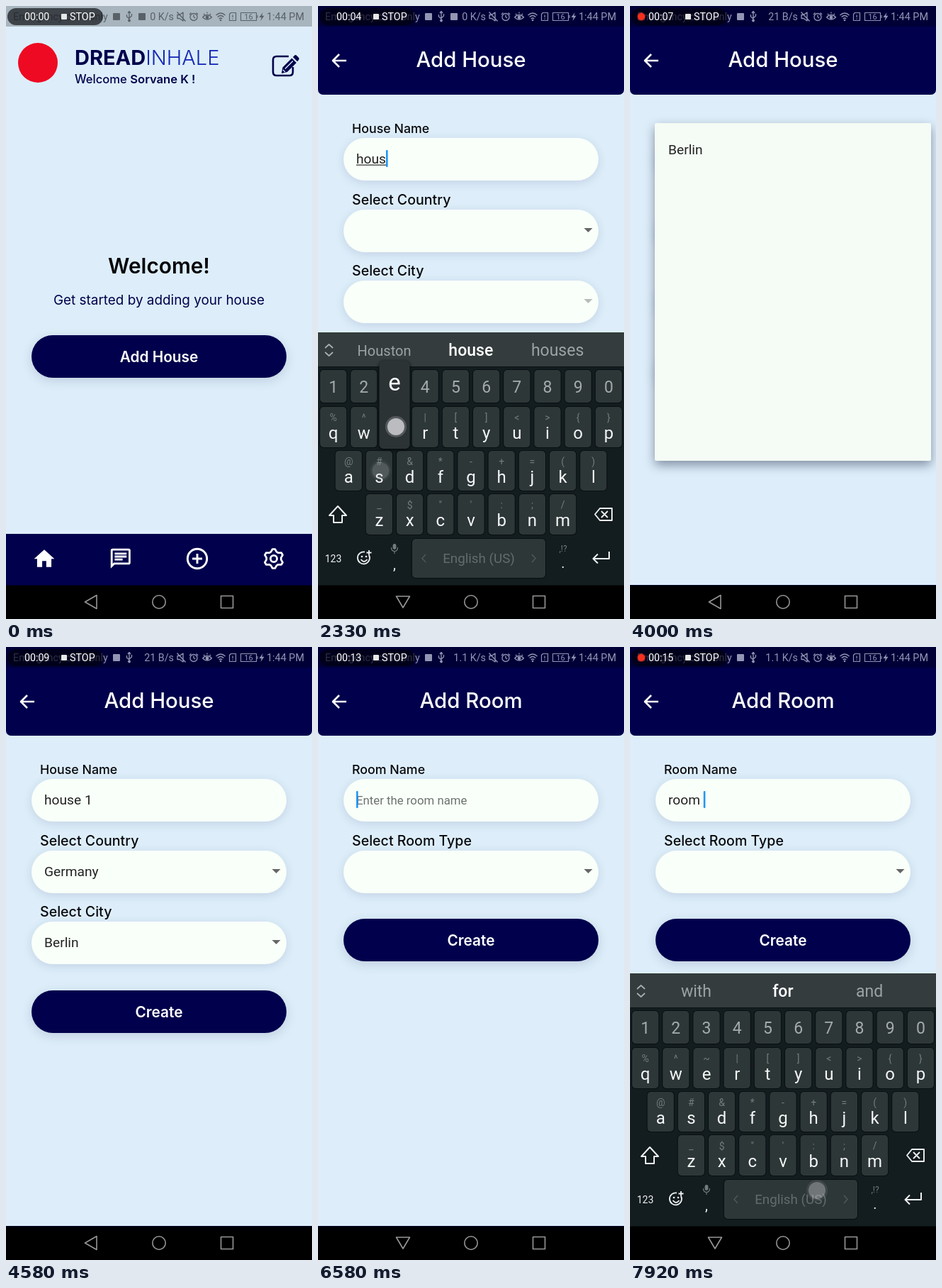
Write an HTML page with a canvas that moves like this. It is 432 px wide and 864 px high and loops after 8000 ms.

```html
<!DOCTYPE html>
<html lang="en">
<head>
<meta charset="utf-8">
<title>Adding a house and a room</title>
<style>
html, body { margin: 0; width: 100%; height: 100%; overflow: hidden; background: #ddeefa; }
canvas { display: block; width: 100vw; height: 100vh; }
</style>
</head>
<body>
<canvas id="stage"></canvas>
<script>
const W = 432, H = 864, LOOP = 8000, FPS = 12;
const NAVY = '#00004c', SKY = '#ddeefa', FIELD = '#f9fff9';
const canvas = document.getElementById('stage'), c = canvas.getContext('2d');
const dpr = window.devicePixelRatio || 1;
canvas.width = W * dpr;
canvas.height = H * dpr;

const ramp = (t, a, b) => Math.min(1, Math.max(0, (t - a) / (b - a)));
const ease = p => 1 - (1 - p) ** 3;
const between = (t, a, b) => t >= a && t < b;

// ---- drawing helpers ----
function group(draw, { x = 0, y = 0, scale = 1, alpha = 1 } = {}) {
  c.save();
  c.translate(x, y);
  c.scale(scale, scale);
  c.globalAlpha *= alpha;
  draw();
  c.restore();
}
function text(s, x, y, size, fill, { weight = 400, align = 'left', font = 'Roboto' } = {}) {
  c.font = `${weight} ${size}px ${font}, sans-serif`;
  c.textAlign = align;
  c.fillStyle = fill;
  c.fillText(s, x, y);
  return c.measureText(s).width;
}
const heading = (s, x, y, size, fill, weight = 500, align = 'center') =>
  text(s, x, y, size, fill, { weight, align, font: 'Inter' });
const centred = (s, x, y, size, fill, weight = 400) => text(s, x, y, size, fill, { weight, align: 'center' });

function box(x, y, w, h, r, fill, shadow) {
  c.save();
  if (shadow) [c.shadowColor, c.shadowBlur, c.shadowOffsetY] = shadow;
  c.fillStyle = fill;
  c.beginPath();
  c.roundRect(x, y, w, h, r);
  c.fill();
  c.restore();
}
function disc(x, y, r, fill) {
  c.fillStyle = fill;
  c.beginPath();
  c.arc(x, y, r, 0, 7);
  c.fill();
}
function line(d, color, width, x = 0, y = 0) {
  group(() => {
    c.strokeStyle = color;
    c.lineWidth = width;
    c.lineJoin = 'round';
    c.stroke(new Path2D(d));
  }, { x, y });
}
function shape(d, fill, x = 0, y = 0, scale = 1) {
  group(() => { c.fillStyle = fill; c.fill(new Path2D(d), 'evenodd'); }, { x, y, scale });
}
const ring = r => `M${r} 0A${r} ${r} 0 1 1 ${-r} 0A${r} ${r} 0 1 1 ${r} 0Z`;

// ---- script of the recording ----
const keyRows = [
  ['1234567890', 513, 46, 21.6, ''],
  ['qwertyuiop', 565, 57, 21.6, '%^~|[]<>{}'],
  ['asdfghjkl', 627, 56, 43.2, '@#&*-+=()'],
  ['zxcvbnm', 688, 57, 86.4, '_$"\':;/']
];
const keys = { ' ': { x: 264, y: 738, h: 55 } };
for (const [chars, y, h, x0, hints] of keyRows)
  [...chars].forEach((ch, i) => keys[ch] = { x: x0 + i * 43.2, y, h, hint: hints[i] });

const HOLD = 90;
const housePresses = [['h', 1420], ['o', 1640], ['u', 1900], ['s', 2140], ['e', 2290], [' ', 2520], ['1', 2720]];
const roomPresses = [['r', 6950], ['o', 7150], ['o', 7330], ['m', 7570], [' ', 7790]];
const presses = [...housePresses, ...roomPresses];
const taps = [[216, 494, 400], [330, 317, 3050], [100, 545, 3480], [330, 417, 3720],
  [90, 202, 4120], [216, 514, 4700], [216, 536, 5960],
  ...presses.map(([ch, t]) => [keys[ch].x + (ch === ' ' ? 0 : 2), keys[ch].y + 28, t])];
const typed = (list, t) => list.filter(p => t >= p[1] + HOLD).map(p => p[0]).join('');

const suggestions = {
  h: 'have he his', ho: 'how home hope', hou: 'hours hour house', hous: 'Houston house houses',
  house: 'houses house housed', 1: '10 1 1st', r: 'are r right', ro: 'room road role',
  roo: 'roof room root', room: 'rooms room roommate'
};
const countries = ['Austria', 'Belgium', 'Canada', 'Denmark', 'Egypt', 'France', 'Germany', 'Italy'];

// ---- screens ----
function button(label, y) {
  box(36, y, 360, 60, 30, NAVY, ['rgba(0,0,60,.14)', 16, 4]);
  heading(label, 216, y + 37.5, 20.8, '#fff', 600);
}

function editIcon() {
  line('M399 71H382Q377 71 377 76V93Q377 98 382 98H400Q405 98 405 93V86', NAVY, 2.6);
  shape('M389 95L390.5 86.5L403.5 73.5L410 80L397 93ZM405 72L407.5 69.5Q409 68.5 410.5 70L413 72.5Q414.5 74 413.5 75.5L411.3 78.2Z', NAVY);
  line('M394 88.5L405 77.5M391 90L394 93', SKY, 1.3);
}

function gear(x, y) {
  let d = '';
  for (let i = 0; i < 24; i++) {
    const r = i % 4 < 2 ? 13.6 : 10.4, a = (i - .5) * Math.PI / 12;
    d += `${i ? 'L' : 'M'}${r * Math.sin(a)} ${-r * Math.cos(a)}`;
  }
  line(d + 'Z', '#fff', 2.7, x, y);
  line(ring(4.6), '#fff', 2.8, x, y);
}

function home(hasHouse) {
  box(0, 0, W, 817, 0, SKY);
  disc(45, 80, 28, '#ee0a22');
  const w = heading('DREAD', 97, 83, 29, NAVY, 700, 'left');
  heading('INHALE', 97 + w, 83, 29, '#1426b4', 300, 'left');
  const hello = heading('Welcome ', 97, 108.5, 16.6, NAVY, 500, 'left');
  heading('Sorvane K !', 97 + hello, 108.5, 16.6, NAVY, 600, 'left');
  editIcon();
  if (hasHouse) {
    box(167, 151, 98, 58, 13, NAVY);
    centred('house 1', 215.5, 185, 16.5, '#fff', 500);
  }
  group(() => {
    heading(hasHouse ? 'Your Rooms' : 'Welcome!', 216, 376.5, 29.8, '#050508', 600);
    heading(`Get started by adding your ${hasHouse ? 'rooms' : 'house'}`, 216, 420.5, 18.9, NAVY, 400);
    button(hasHouse ? 'Add Room' : 'Add House', 464);
  }, { y: hasHouse ? 42 : 0 });

  box(0, 744, W, 73, 0, NAVY);
  shape('M10 20v-6h4v6h5v-8h3L12 3 2 12h3v8z', '#fff', 36.7, 762, 1.44);
  shape('M4 4h16v12H5.2L4 17.2zM4 2Q2 2 2 4V22L6 18H20Q22 18 22 16V4Q22 2 20 2ZM6 12h8v2H6zM6 9h12v2H6zM6 6h12v2H6z', '#fff', 145, 762, 1.4);
  line(ring(13.7) + 'M-7 0H7M0 -7V7', '#fff', 2.9, 270, 779);
  gear(378, 779);
}

function field(label, y, size) {
  heading(label, 48, y - 7.2, size, '#08080c', 500, 'left');
  box(36, y, 360, 60, 30, FIELD, ['rgba(0,0,70,.12)', 14, 3]);
}
function select(label, y, value, enabled = true) {
  field(label, y, 19.6);
  shape('M375.5 0H387.5L381.5 6Z', enabled ? '#666' : '#b7bcba', 0, y + 26);
  if (value) text(value, 54, y + 36, 19.2, '#222');
}
function input(label, hint, value, focused) {
  field(label, 186, 17.8);
  if (!value) text(hint, 54, 221.5, 16.8, '#6d716e');
  const w = text(value, 54, 221.5, 19.2, '#222');
  const start = value.lastIndexOf(' ') + 1;
  if (focused && start < value.length) {
    const x = 54 + c.measureText(value.slice(0, start)).width;
    box(x, 223.5, 54 + w - x, 1.3, 0, '#333');
  }
  if (focused) box(54 + w, 203, 2.6, 24, 1, '#2196f3');
}
function form(title, body) {
  box(0, 0, W, 816, 0, SKY);
  box(0, 0, W, 125, [0, 0, 7, 7], NAVY);
  line('M40 77H21.5M30 68L21 77L30 86', '#fff', 2.6);
  heading(title, 216, 86, 29.4, '#fff', 500);
  body();
}
function menu(items, t, opens, closes) {
  const p = ease(ramp(t, opens, opens + 160)), alpha = p * (1 - ramp(t, closes, closes + 130));
  if (!alpha) return;
  group(() => {
    box(35, 165, 390, 476 * (.3 + .7 * p), 2, '#f5fbf5', ['rgba(0,10,40,.42)', 15, 6]);
    items.forEach((s, i) => {
      if (i * 57.6 < 430 * p) text(s, 54, 208.5 + i * 57.6, 19.2, '#222');
    });
  }, { alpha });
}
function houseForm(t) {
  form('Add House', () => {
    input('House Name', 'Enter the house name', typed(housePresses, t), between(t, 750, 3000));
    select('Select Country', 287, t > 3560 && 'Germany');
    select('Select City', 387, t > 4200 && 'Berlin', t > 3560);
    button('Create', 484);
    menu(countries, t, 3130, 3560);
    menu(['Berlin'], t, 3790, 4200);
  });
}
function roomForm(t) {
  form('Add Room', () => {
    input('Room Name', 'Enter the room name', typed(roomPresses, t), t > 6300);
    select('Select Room Type', 287);
    button('Create', 383);
  });
}

// ---- keyboard ----
function keyboard(t) {
  box(0, 460, W, 357, 0, '#131c1f');
  box(0, 460, W, 48, 0, '#343c3d');
  box(0, 508, W, 1, 0, '#0b1214');
  line('M10 482L15.5 477L21 482M10 488L15.5 493L21 488', '#a9afb0', 1.7);
  const word = typed(t < 5000 ? housePresses : roomPresses, t).split(' ').pop();
  (suggestions[word] || 'with for and').split(' ').forEach((s, i) => {
    c.font = '400 23px Roboto, sans-serif';
    const size = Math.min(23, 23 * 76 / c.measureText(s).width);
    centred(s, 93.5 + i * 122.3, 493, size, i === 1 ? '#fff' : '#9da3a4', i === 1 ? 500 : 400);
  });

  for (const [ch, k] of Object.entries(keys)) {
    if (ch === ' ') continue;
    keycap(k.x - 18.6, k.y, 37.2, k.h);
    if (k.hint) {
      centred(k.hint, k.x, k.y + 20, 14, '#737b7d');
      centred(ch, k.x, k.y + 45, 24, '#f4f6f6');
    } else centred(ch, k.x, k.y + 31.5, 23, '#a5abac');
  }
  keycap(133, 751, 188, 55);
  centred('English (US)', 227, 785, 18.8, '#626b6d');
  line('M152 773L147 778.5L152 784M302 773L307 778.5L302 784', '#4d5759', 1.5);

  const ink = '#eef1f1';
  line('M28 705L40 718H34V728H22V718H16Z', ink, 2);
  line('M398 708H415V725H398L391 716.5ZM400 712L409 721M409 712L400 721', ink, 1.9);
  centred('123', 21.5, 784, 14, ink);
  line('M72 774A8.5 8.5 0 1 1 66 769.5M60.5 780Q65 786 69.5 780M72 767V774M68.5 770.5H75.5', ink, 1.8, 0, 0);
  disc(62, 776, 1.3, ink);
  disc(68, 776, 1.3, ink);
  box(105.6, 758, 4.8, 8, 2.4, '#737b7d');
  line('M103.5 763Q103.5 768.5 108 768.5T112.5 763M108 768.5V772', '#737b7d', 1.2);
  centred(',', 108, 794, 20, ink);
  centred(',!?', 346, 769, 12, '#737b7d');
  centred('.', 346, 792, 20, ink);
  line('M411 769V779H389M395 772.5L388.5 779L395 785.5', ink, 2);

  for (const [ch, at] of presses) {
    if (ch === ' ' || !between(t, at, at + HOLD)) continue;
    const k = keys[ch];
    box(k.x - 21.5, k.y - 65, 43, k.h + 67, 6, '#2b3335', ['rgba(0,0,0,.8)', 4, 1]);
    centred(ch, k.x, k.y - 23, 33, '#fff');
  }
}
function keycap(x, y, w, h) {
  box(x - 1, y - 1, w + 2, h + 2, 6, '#080f11');
  box(x, y, w, h, 5, '#2e3738');
}

// ---- system bars ----
function statusBar(t, dark) {
  box(0, 0, W, 29, 0, `rgba(0,0,0,${dark ? .28 : .24})`);
  const ink = dark ? '#9494b4' : '#596168';
  text('Emergency calls only', 10, 20, 14.3, ink);
  box(2, 3, 135, 24, 12, dark ? 'rgba(0,0,14,.68)' : 'rgba(20,24,28,.72)');
  const clock = Math.max(0, t * .00204 - .21);
  if (clock % 1 > .56) {
    disc(16, 15, 6.2, 'rgba(255,50,30,.35)');
    disc(16, 15, 5, '#f5301e');
  }
  text('00:' + String(Math.floor(clock)).padStart(2, '0'), 26, 20, 14.2, '#fff');
  box(78, 11, 8, 8, 1, '#e8e8e8');
  text('STOP', 90, 20, 14.3, '#fff');

  box(151, 10, 10, 10, 1, ink);
  line('M174 8V21M170.5 12V15L174 18M177.5 11V14L174 17M172 10L174 7.5L176 10', ink, 1.3);
  disc(174, 20.5, 1.9, ink);
  const rate = t < 3300 ? '0 K/s' : t < 5080 ? '21 B/s' : t < 6080 ? '1 K/s' : '1.1 K/s';
  if (rate.length < 6) box(187, 10, 10, 10, 1, ink);
  text(rate, 237, 20, 14.3, ink, { align: 'right' });
  line('M242 12.5H245L250 9V21L245 17.5H242ZM241.5 8.5L253.5 21.5', ink, 1.3);
  line(ring(5) + 'M0 -3V0L2.2 1.5M-6 -3.5L-3.5 -6M6 -3.5L3.5 -6', ink, 1.3, 265, 15.5);
  line('M277.5 16Q284 9 290.5 16Q284 22 277.5 16M279 11L280.5 12.5M284 8.5V10.5M289 11L287.5 12.5', ink, 1.3);
  disc(284, 16, 2.4, ink);
  line('M296.5 13Q303 7 309.5 13M298.7 15.6Q303 11.5 307.3 15.6M300.8 18Q303 16 305.2 18', ink, 1.4);
  disc(303, 20, 1.3, ink);
  line('M317.5 9.5H324.5V20.5H315.5V11.5ZM320 12.5V16M320 17.4V18.8', ink, 1.2);
  line('M331.5 9.5H353.5V20.5H331.5ZM355 13V17', ink, 1.1);
  centred('16', 342.5, 19, 11, ink);
  shape('M362.5 9L357.5 16H360.7L359.5 21L364.5 13.8H361.3Z', ink);
  text('1:44 PM', 368, 20, 14.4, ink);
}
function navBar(keyboardMode) {
  box(0, 816.5, W, 48, 0, '#000');
  const grey = '#969696';
  line(keyboardMode ? 'M110.5 832H129.5L120 848Z' : 'M128 830.5V849.5L111.5 840Z', grey, 1.6);
  line(ring(9.2), grey, 1.6, 216, 840);
  line('M303.5 831.5H320.5V848.5H303.5Z', grey, 1.6);
}
function touches(t) {
  for (const [x, y, at] of taps) {
    if (!between(t, at, at + 240)) continue;
    const alpha = t < at + HOLD ? .8 : .36 * (1 - ramp(t, at + HOLD, at + 240)) + .06;
    group(() => {
      disc(x, y, 15, 'rgba(170,170,180,.4)');
      disc(x, y, 12, '#d4d4d8');
    }, { alpha });
  }
}

function render(t) {
  c.setTransform(dpr * canvas.width / (W * dpr), 0, 0, dpr, 0, 0);
  const houseIn = ease(ramp(t, 500, 680)) * (1 - ramp(t, 5070, 5200));
  const roomIn = ease(ramp(t, 6080, 6260));
  home(t > 4900);
  if (houseIn) group(() => houseForm(t), { y: 130 * (1 - houseIn), alpha: houseIn });
  if (roomIn) group(() => roomForm(t), { y: 130 * (1 - roomIn), alpha: roomIn });

  const shown = ease(ramp(t, 1090, 1260)) * (1 - ramp(t, 2930, 3060)) + ease(ramp(t, 6600, 6770));
  if (shown) group(() => keyboard(t), { y: 357 * (1 - shown) });
  statusBar(t, houseIn > .5 || roomIn > .5);
  navBar(between(t, 800, 3000) || t > 6330);
  touches(t);
}

const began = performance.now();
function tick(now) {
  const t = Math.max(0, now - began) % LOOP;
  render(Math.floor((t + 5) * FPS / 1000) * 1000 / FPS);
  requestAnimationFrame(tick);
}
c.setTransform(dpr, 0, 0, dpr, 0, 0);
render(0);
requestAnimationFrame(tick);
</script>
</body>
</html>
```
